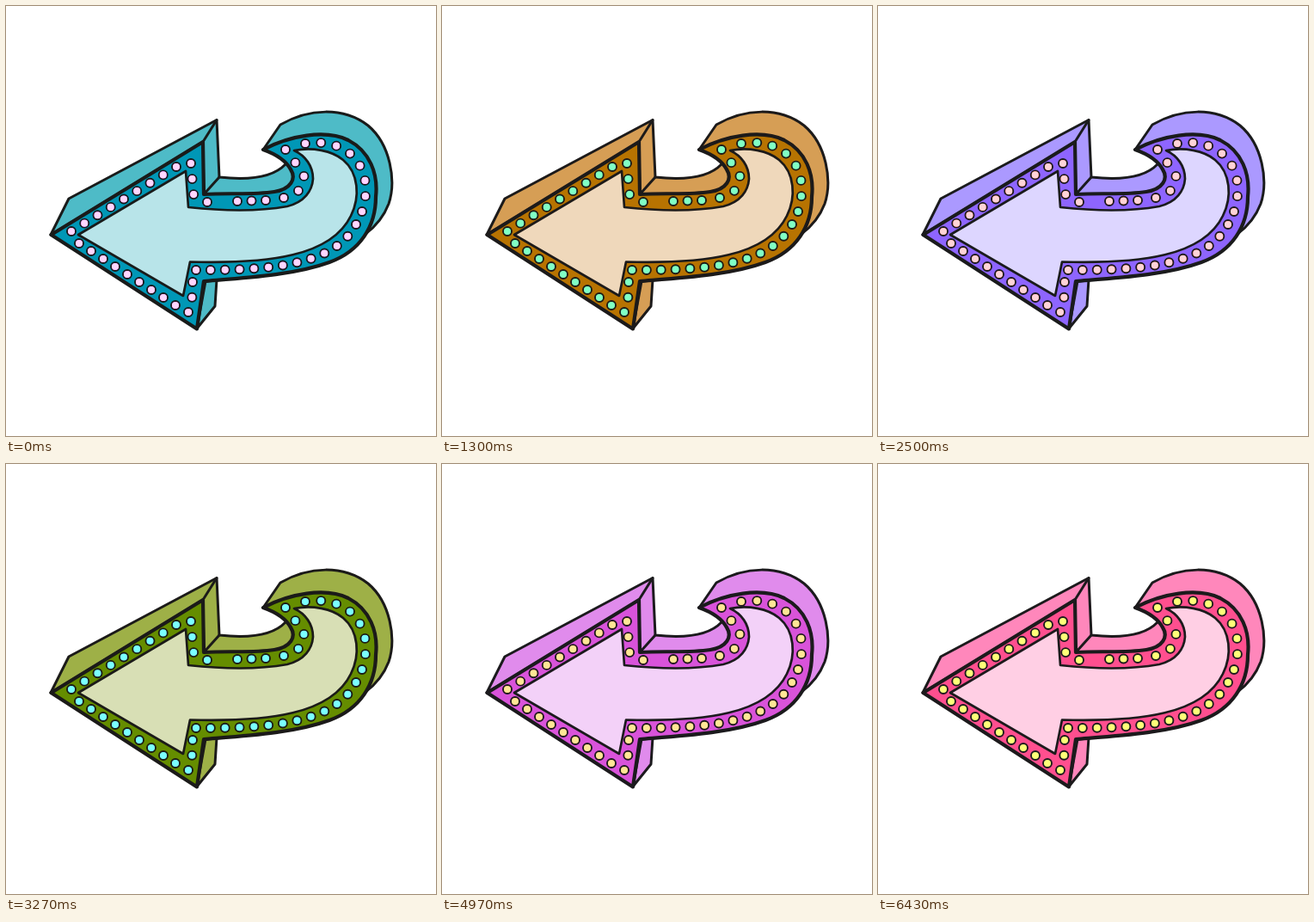
An HTML page that plays this animation: 500 px wide and 500 px high, repeating every 6.46 s.

```html
<!DOCTYPE html>
<html lang="en">
<head>
<meta charset="utf-8">
<title>Marquee arrow</title>
<style>
  html, body { margin: 0; width: 100%; height: 100%; overflow: hidden; background: #fff; }
  svg { display: block; width: 100vw; height: 100vh; }
  path, circle { stroke: #1c1a1c; stroke-linejoin: round; stroke-linecap: round; }
  .side { fill: #ff87bb; stroke-width: 3; }
  .rim { fill: #ff4f8f; stroke-width: 4.2; }
  .face { fill: #ffcfe4; stroke-width: 2.7; }
  .bulb { fill: #ffff78; stroke-width: 1.9; }
</style>
</head>
<body>
<svg id="arrow" viewBox="0 0 500 500">
  <path class="side" d="M52 266L73 224L245 132.5L248 199C275 202 308 202 325 184H340V220L230 219L229 158Z"/>
  <path class="side" d="M245 132.5L229 158M248 199L230 219"/>
  <path class="side" d="M299 167L319 138C352 119 392 117 421 139C447 161 454 203 445 230Q437 251 418 265L415 200L370 152Z"/>
  <path class="side" d="M232 320L245 318L243 349L222 375Z"/>
  <path class="rim" d="M52.5 266L229 158L230 219C258 217 286 220 312 216C331 213 338 201 331 190C325 179 313 172 299 167C329 151 371 143 398 156C423 169 433 195 430 222C430 256 412 285 376 298C335 313 280 316 230 320L222 375.5Z"/>
  <path class="face" d="M84 266L209 192L212 234C249 238 294 239 327 233C347 228 356 215 357 201C357 186 348 174 335 168C356 164 379 168 392 179C410 194 412 222 401 244C378 291 306 300 214 297.5L206 337Z"/>
  <g id="bulbs"></g>
</svg>
<script>
  const SVG = "http://www.w3.org/2000/svg";
  const make = (name, attrs) => {
    const node = document.createElementNS(SVG, name);
    for (const key in attrs) node.setAttribute(key, attrs[key]);
    return node;
  };
  const arrow = document.getElementById("arrow");
  const bulbs = document.getElementById("bulbs");

  // Sets evenly spaced bulbs along a track, both ends included.
  function string(count, d) {
    const track = make("path", { d });
    const gap = track.getTotalLength() / (count - 1);
    for (let i = 0; i < count; i++) {
      const { x, y } = track.getPointAtLength(i * gap);
      bulbs.append(make("circle", { class: "bulb", cx: x, cy: y, r: 5 }));
    }
  }
  string(9, "M76 262L198 187");
  string(4, "M215 183L218 219L234 228");
  string(3, "M269 227L302 226");
  string(5, "M323 223C345 218 354 201 340 186Q333 179 325 167");
  string(8, "M348 160C400 152 430 190 414 239");
  string(13, "M407 254C384 296 327 308 221 307");
  string(3, "M217 321Q218 340 212 356");
  string(9, "M197 348L85 276");

  const LOOP = 6460, TICK = 100 / 3;
  const start = performance.now();

  // Two hue steps for every three ticks, and three evenly spread double skips per loop.
  function hueAt(time) {
    const tick = Math.floor((time + 5) / TICK);
    const step = Math.floor(tick * 2 / 3) + 2 * Math.floor(tick * 3 / 193);
    return (216 + 36 * step) % 360;
  }

  function draw() {
    const time = Math.max(0, performance.now() - start) % LOOP;
    arrow.style.filter = `hue-rotate(${hueAt(time)}deg)`;
    requestAnimationFrame(draw);
  }
  draw();
</script>
</body>
</html>
```
